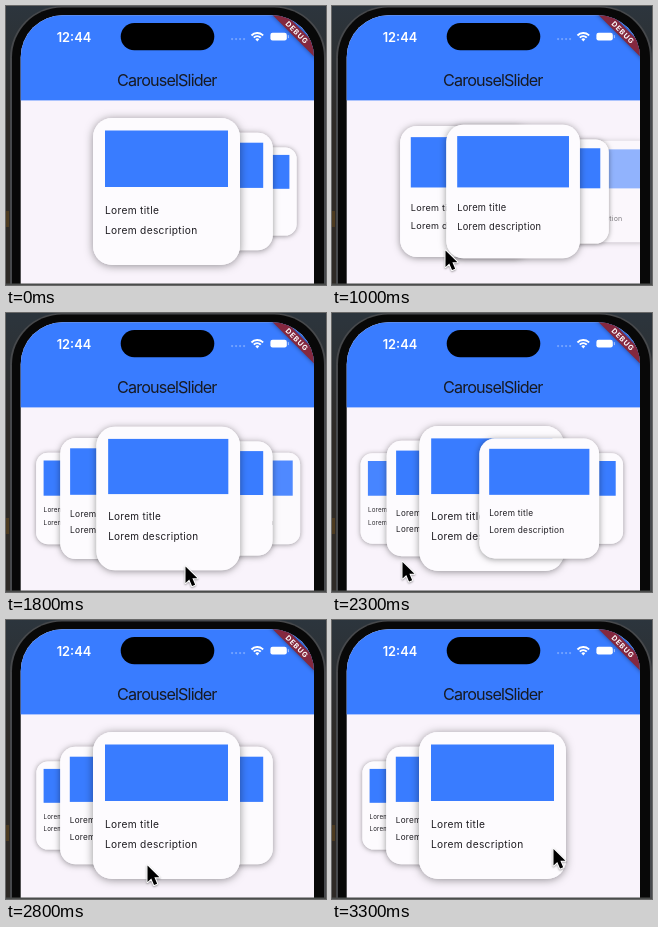
An HTML page with a canvas for the animation above (3.4 s loop, 320 px wide and 279 px high).

```html
<!DOCTYPE html>
<html lang="en">
<head>
<meta charset="utf-8">
<title>Carousel slider</title>
<style>
html, body { margin: 0; width: 100%; height: 100%; overflow: hidden; background: #222; }
canvas { display: block; width: 320px; height: 279px; }
</style>
</head>
<body>
<canvas id="stage"></canvas>
<script>
const LOOP = 3400, STEP = 100, CARDS = 5;
const BLUE = '#397cff', PAGE = '#f9f3fb', SANS = 'Inter, Roboto, sans-serif';
const SWIPES = [917, 1615, 2291, 2850], SETTLE = 360;
// Pointer path: time, x, y
const POINTER = [
  [400, 335, 227], [600, 250, 242], [700, 235, 246], [800, 205, 246], [900, 130, 245],
  [1000, 113.5, 244.5], [1200, 113.5, 253], [1400, 113.5, 253], [1520, 225, 252], [1640, 110, 254],
  [1800, 179.5, 253.5], [2000, 225, 248], [2100, 215, 248], [2300, 70.5, 249], [2500, 100, 251],
  [2600, 215, 246], [2700, 220, 246], [2800, 141.5, 245.5], [2900, 75, 248], [3100, 130, 242],
  [3300, 221.5, 229]
];

const canvas = document.getElementById('stage');
const ctx = canvas.getContext('2d');
const ratio = window.devicePixelRatio || 1;
canvas.width = 320 * ratio;
canvas.height = 279 * ratio;

const clamp = v => Math.min(1, Math.max(0, v));
const lerp = (a, b, k) => a + (b - a) * k;
const smooth = v => v * v * (3 - 2 * v);
const easeOut = v => 1 - (1 - v) ** 3;

function rounded(x, y, w, h, r, fill) {
  ctx.beginPath();
  ctx.roundRect(x, y, w, h, r);
  ctx.fillStyle = fill;
  ctx.fill();
}

function rect(x, y, w, h, fill) {
  ctx.fillStyle = fill;
  ctx.fillRect(x, y, w, h);
}

function label(text, x, y, font, fill, spacing = 0, align = 'left') {
  ctx.font = `${font} ${SANS}`;
  ctx.letterSpacing = spacing + 'px';
  ctx.textAlign = align;
  ctx.fillStyle = fill;
  ctx.fillText(text, x, y);
}

function pageAt(t) {
  return SWIPES.reduce((sum, start) => sum + easeOut(clamp((t - start) / SETTLE)), 0);
}

// Cards shrink with distance; the third step away grows again while fading out.
function cardPose(offset) {
  const d = Math.abs(offset), whole = Math.floor(d), part = d - whole;
  const stops = [0, 47.5, 86, 138];
  return {
    x: 160.5 + Math.sign(offset) * lerp(stops[whole], stops[whole + 1], smooth(part)),
    scale: d < 2 ? 1 - 0.2 * d : 0.6 + 0.2 * (d - 2),
    alpha: clamp(3 - d)
  };
}

// The shadow is kept outside the card so that it never shows through a fading one.
function drawShadow(scale) {
  ctx.save();
  ctx.beginPath();
  ctx.rect(-200, -200, 400, 400);
  ctx.roundRect(-73, -73, 146, 146, 18.5);
  ctx.clip('evenodd');
  ctx.shadowColor = 'rgba(0,0,0,.42)';
  ctx.shadowBlur = 8 * scale * ratio;
  ctx.shadowOffsetY = scale * ratio;
  rounded(-73.5, -73.5, 147, 147, 19, '#fdfbfe');
  ctx.restore();
}

function drawCard(offset) {
  if (Math.abs(offset) > 2.999) return;
  const { x, scale, alpha } = cardPose(offset);
  ctx.save();
  ctx.globalAlpha = alpha;
  ctx.translate(x, 185.5);
  ctx.scale(scale, scale);
  drawShadow(scale);
  rounded(-73.5, -73.5, 147, 147, 19, '#fdfbfe');
  rect(-61.5, -61, 123, 56.5, BLUE);
  label('Lorem title', -61.5, 22, '10.2px', '#1d1b20', 0.31);
  label('Lorem description', -61.5, 42.5, '10.2px', '#1d1b20', 0.31);
  ctx.restore();
}

function drawCarousel(page) {
  const front = Math.ceil(page - 0.001);
  [...Array(CARDS).keys()]
    .sort((a, b) => Math.abs(b - front) - Math.abs(a - front))
    .forEach(i => drawCard(i - page));
}

function drawPhone() {
  const backdrop = ctx.createLinearGradient(0, 0, 0, 120);
  backdrop.addColorStop(0, '#2c353d');
  backdrop.addColorStop(1, '#2e2a26');
  rect(0, 0, 320, 279, backdrop);
  rect(0, 205, 3, 16, '#4d3b20');
  rounded(4, 0, 316, 340, 52, '#47494c');
  rounded(6, 1.5, 312, 340, 50, '#080808');
}

function drawStatus() {
  label('12:44', 50.7, 35.5, '600 12.8px', '#fff');
  rounded(114.7, 17, 93.6, 27.3, 13.6, '#000');
  for (let i = 0; i < 4; i++) rounded(225 + i * 4, 32, 2.2, 2.2, 1.1, 'rgba(255,255,255,.3)');
  ctx.strokeStyle = '#fff';
  ctx.lineWidth = 1.9;
  for (const r of [8, 4.8]) {
    ctx.beginPath();
    ctx.arc(251.3, 35, r, -Math.PI * 0.76, -Math.PI * 0.24);
    ctx.stroke();
  }
  ctx.beginPath();
  ctx.moveTo(251.3, 35.5);
  ctx.arc(251.3, 35, 2.6, -Math.PI * 0.76, -Math.PI * 0.24);
  ctx.fillStyle = '#fff';
  ctx.fill();
  rounded(264.4, 26.8, 16.4, 7.6, 2.2, '#fff');
  rounded(281.8, 29, 1.2, 3.2, 0.6, 'rgba(255,255,255,.5)');
}

function drawBanner() {
  ctx.save();
  ctx.translate(290.5, 26.5);
  ctx.rotate(Math.PI / 4);
  ctx.shadowColor = 'rgba(0,0,0,.45)';
  ctx.shadowBlur = 4 * ratio;
  rect(-45, -5.2, 90, 9.8, '#84283f');
  ctx.shadowColor = 'transparent';
  label('DEBUG', 0.4, 2.3, '700 7.2px', '#fff', 0.8, 'center');
  ctx.restore();
}

function drawPointer(t) {
  let i = POINTER.findIndex(key => key[0] > t);
  if (i < 0) i = POINTER.length;
  const a = POINTER[Math.max(0, i - 1)], b = POINTER[Math.min(i, POINTER.length - 1)];
  const k = a === b ? 0 : (t - a[0]) / (b[0] - a[0]);
  ctx.save();
  ctx.translate(lerp(a[1], b[1], k), lerp(a[2], b[2], k));
  ctx.scale(0.84, 0.84);
  const arrow = new Path2D('M0 0V19.5L4.5 15.4L7.8 23.2L11.5 21.6L8.2 14H14.2Z');
  ctx.lineJoin = 'round';
  ctx.lineWidth = 2.4;
  ctx.strokeStyle = '#fff';
  ctx.shadowColor = 'rgba(0,0,0,.35)';
  ctx.shadowBlur = 2 * ratio;
  ctx.shadowOffsetY = ratio;
  ctx.stroke(arrow);
  ctx.shadowColor = 'transparent';
  ctx.fillStyle = '#000';
  ctx.fill(arrow);
  ctx.restore();
}

function draw(now) {
  const t = Math.floor((now % LOOP) / STEP) * STEP;
  ctx.setTransform(ratio, 0, 0, ratio, 0, 0);
  drawPhone();
  ctx.save();
  ctx.beginPath();
  ctx.roundRect(14.7, 9.2, 293.3, 340, 42);
  ctx.clip();
  rect(14, 9, 295, 270, PAGE);
  drawCarousel(pageAt(t));
  rect(14, 9, 295, 85.4, BLUE);
  label('CarouselSlider', 111, 80, '16.2px', '#171a22', -0.86);
  drawStatus();
  drawBanner();
  ctx.restore();
  rect(0, 277.5, 320, 1.5, '#4a4c4b');
  drawPointer(t);
}

const began = performance.now();
function tick() {
  draw(performance.now() - began);
  requestAnimationFrame(tick);
}
tick();
</script>
</body>
</html>
```
